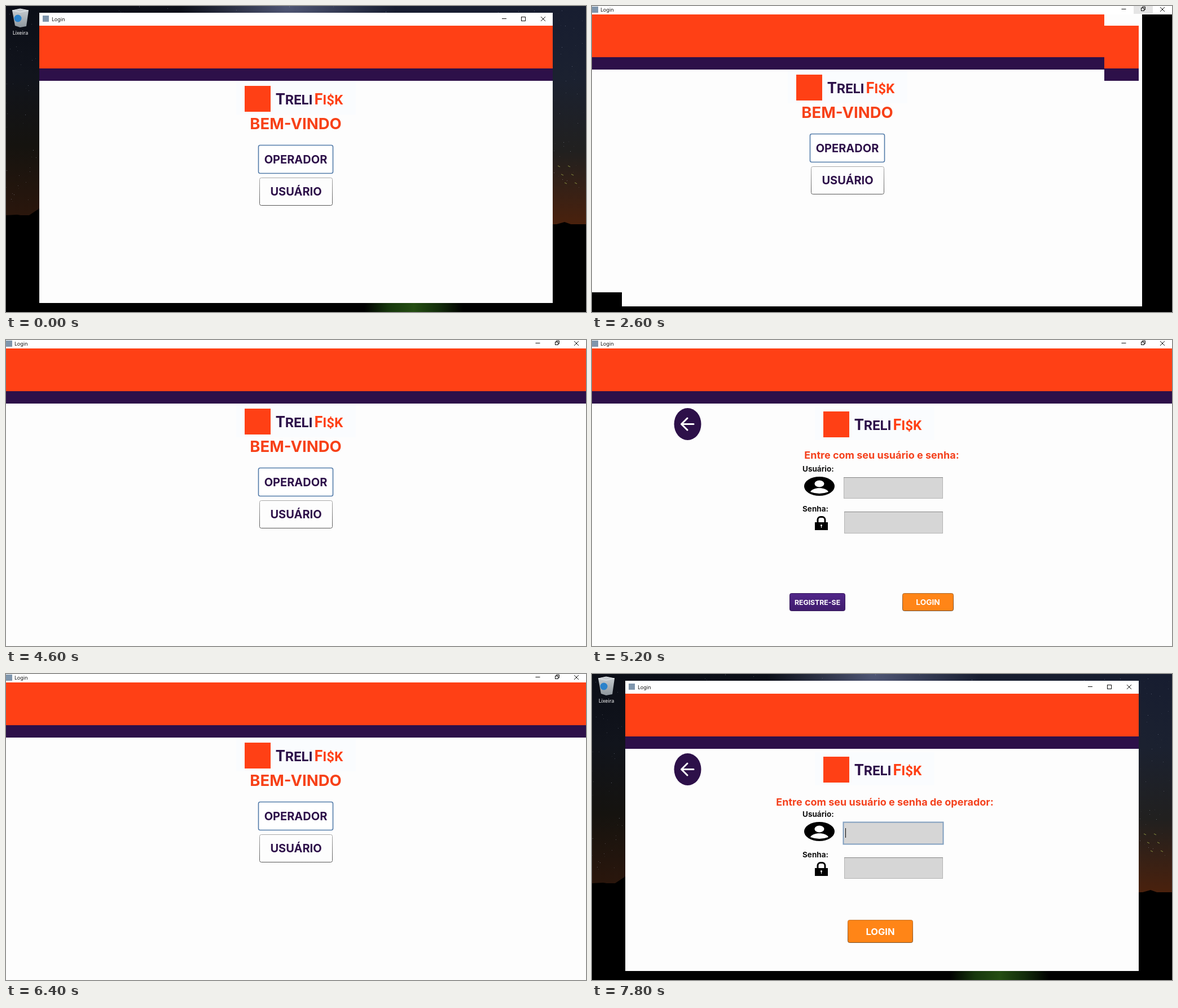
These frames come from a looping animation (1028x544 px, 8 s). An HTML page with a canvas:

```html
<!DOCTYPE html>
<html lang="pt">
<head>
<meta charset="utf-8">
<title>Login</title>
<style>
html, body { margin: 0; width: 100%; height: 100%; overflow: hidden; background: #000; }
canvas { display: block; }
</style>
</head>
<body>
<canvas id="stage" width="1028" height="544"></canvas>
<script>
const c = document.getElementById('stage').getContext('2d');
const ORANGE = '#ff4015', PURPLE = '#2d1049', PAGE = '#fdfdfd', INK = '#111';
const LOOP = 8000;

// start time, page, window mode, hovered window button
const steps = [
  [0, 'welcome', 'window', ''],
  [2400, 'welcome', 'window', 'size'],
  [2600, 'welcome', 'growing', 'size'],
  [2800, 'welcome', 'full', 'size'],
  [3400, 'welcome', 'full', ''],
  [3600, 'operator', 'full', ''],
  [4600, 'welcome', 'full', ''],
  [5000, 'user', 'full', ''],
  [5800, 'welcome', 'full', ''],
  [6000, 'blank', 'full', ''],
  [6200, 'welcome', 'full', ''],
  [7000, 'welcome', 'window', 'both'],
  [7200, 'welcome', 'window', ''],
  [7600, 'operator', 'window', '']
];

function rect(x, y, w, h, fill) {
  c.fillStyle = fill;
  c.fillRect(x, y, w, h);
}

function ellipse(x, y, rx, ry, fill) {
  c.fillStyle = fill;
  c.beginPath();
  c.ellipse(x, y, rx, ry, 0, 0, 7);
  c.fill();
}

function line(color, width, ...points) {
  c.strokeStyle = color;
  c.lineWidth = width;
  c.beginPath();
  points.forEach(([x, y]) => c.lineTo(x, y));
  c.stroke();
}

function text(str, x, y, size, fill, align = 'left', font = '700', family = 'Inter') {
  c.font = `${font} ${size}px "${family}", sans-serif`;
  c.textAlign = align;
  c.fillStyle = fill;
  c.fillText(str, x, y);
  return c.measureText(str).width;
}

function gradient(y0, y1, ...colors) {
  const g = c.createLinearGradient(0, y0, 0, y1);
  colors.forEach((color, i) => g.addColorStop(i / (colors.length - 1), color));
  return g;
}

function button(label, x, y, w, h, size, fill, ink, border, width = 1) {
  c.beginPath();
  c.roundRect(x + .5, y + .5, w - 1, h - 1, 3);
  c.fillStyle = fill;
  c.fill();
  c.strokeStyle = border;
  c.lineWidth = width;
  c.stroke();
  text(label, x + w / 2, y + h / 2 + size * .37, size, ink, 'center');
}

function desktop() {
  rect(0, 0, 1028, 544, '#000');
  rect(0, 0, 514, 372, gradient(0, 372, '#0b0e17', '#11141c', '#15130f', '#2a160c'));
  rect(514, 0, 514, 388, gradient(0, 388, '#171d30', '#1b2130', '#21201f', '#4a210d'));
  const haze = c.createRadialGradient(500, 0, 5, 500, 0, 190);
  haze.addColorStop(0, '#4d5472');
  haze.addColorStop(1, '#4d547200');
  rect(300, 0, 400, 12, haze);
  let seed = 7;
  const rand = () => (seed = seed * 16807 % 2147483647) / 2147483647;
  for (let i = 0; i < 650; i++)
    rect(rand() * 1028 | 0, rand() * 350 | 0, 1, 1, `rgba(190,200,220,${rand() * .45})`);
  for (let i = 0; i < 6; i++)
    line('#8c9440', 1, [978 + i * 6, 284 + i * 15 % 45], [982 + i * 6, 286 + i * 15 % 45]);
  c.fillStyle = '#000';
  c.beginPath();
  [[0, 372], [20, 371], [38, 374], [59, 360], [59, 544], [969, 544], [969, 390], [990, 384],
    [1004, 389], [1028, 390], [1028, 544], [0, 544]].forEach(([x, y]) => c.lineTo(x, y));
  c.fill();
  const grass = c.createLinearGradient(635, 0, 810, 0);
  ['#000', '#17370d', '#244d12', '#132d0b', '#000'].forEach((g, i) => grass.addColorStop(i / 4, g));
  rect(635, 528, 175, 16, grass);

  // recycle bin
  c.fillStyle = gradient(5, 38, '#c9ced2', '#8f979d');
  c.beginPath();
  [[11, 8], [25, 5], [40, 8], [36, 36], [25, 38], [16, 35]].forEach(([x, y]) => c.lineTo(x, y));
  c.fill();
  line('#e8ecee', 1, [11, 8], [25, 11], [40, 8], [25, 5], [11, 8]);
  ellipse(21, 22, 6.5, 6.5, '#2a82cb');
  text('Lixeira', 25.5, 51, 9, '#fff', 'center', '400', 'Noto Sans');
}

function titleBar(full, hover) {
  const top = full ? 0 : 12, left = full ? 0 : 59, h = full ? 15 : 23;
  const right = full ? 1028 : 969, mid = full ? 6 : 23;
  const [min, size, close] = full ? [942.5, 977, 1011] : [883, 917, 952];
  rect(left, top, right - left, h, '#fff');
  if (hover) rect(size - 17, top, 34, full ? 14 : h, '#e5e5e5');
  if (hover === 'both') rect(close - 17, top, 34, h, '#f5c3c9');
  rect(full ? 0 : 65, full ? 1 : 17, 11, 11, '#7f96ad');
  text('Login', full ? 15 : 81, full ? 10 : 27, 9, '#111', 'left', '400', 'Noto Sans');
  line(INK, 1, [min - 4, mid - .5], [min + 4, mid - .5]);
  c.strokeStyle = INK;
  if (full) {
    c.strokeRect(size - 3.5, mid - 2.5, 5, 5);
    line(INK, 1, [size - 1.5, mid - 2.5], [size - 1.5, mid - 4.5], [size + 3.5, mid - 4.5],
      [size + 3.5, mid + .5], [size + 1.5, mid + .5]);
  } else c.strokeRect(size - 3.5, mid - 3.5, 7, 7);
  line(INK, 1, [close - 4, mid - 4], [close + 4, mid + 4]);
  line(INK, 1, [close + 4, mid - 4], [close - 4, mid + 4]);
}

function header(x, y, w) {
  rect(x, y, w, 76, ORANGE);
  rect(x, y + 76, w, 22, PURPLE);
}

function logo(x, y) {
  rect(x - 15, y - 7, 212, 59, '#fafcfe');
  rect(x, y + 1, 46, 46, ORANGE);
  let pen = x + 55;
  const parts = [['T', 27, PURPLE], ['RELI', 24, PURPLE], ['F', 27, ORANGE], ['I$K', 24, ORANGE]];
  parts.forEach(([str, size, fill], i) => {
    if (i === 2) pen += 3;
    pen += text(str, pen, y + 34, size, fill, 'left', '700', 'Roboto');
  });
}

function field(x, y, w, h, focus) {
  rect(x, y, w, h, '#d6d6d6');
  c.lineWidth = focus ? 2 : 1;
  c.strokeStyle = focus ? '#819fc0' : '#b4b4b4';
  c.strokeRect(x + .5, y + .5, w - 1, h - 1);
  if (focus) rect(x + 4, y + 11, 1, 17, '#000');
  else line('#858585', 1, [x, y + .5], [x + w, y + .5]);
}

function person(x, y) {
  ellipse(x, y, 27, 17, '#000');
  ellipse(x, y - 4.5, 8.5, 6, '#fff');
  c.beginPath();
  c.moveTo(x - 16, y + 10);
  c.bezierCurveTo(x - 12, y + 1, x + 12, y + 1, x + 16, y + 10);
  c.quadraticCurveTo(x, y + 16, x - 16, y + 10);
  c.fill();
}

function lock(x, y) {
  rect(x, y + 11, 23, 14, '#000');
  c.strokeStyle = '#000';
  c.lineWidth = 3;
  c.beginPath();
  c.roundRect(x + 5, y + 1.5, 13, 16, 5);
  c.stroke();
  rect(x, y + 11, 23, 14, '#000');
  ellipse(x + 11.5, y + 16.5, 1.5, 1.5, '#fff');
  rect(x + 11, y + 17, 1, 4, '#fff');
}

function welcome() {
  logo(423, 121);
  text('BEM-VINDO', 513.5, 199, 27.5, '#f74118', 'center');
  button('OPERADOR', 447, 227, 133, 51, 20, '#fff', PURPLE, '#527ba9', 1.6);
  button('USUÁRIO', 449, 285, 130, 50, 20, PAGE, PURPLE, gradient(285, 335, '#aaa', '#555'));
}

function form(operator) {
  const up = operator ? 0 : 1;
  ellipse(169.5, 149.5, 24, 28.5, PURPLE);
  c.lineCap = c.lineJoin = 'round';
  line('#fff', 3, [180, 149.5], [159, 149.5]);
  line('#fff', 3, [169, 139], [158.5, 149.5], [169, 160]);
  c.lineCap = 'butt';
  c.lineJoin = 'miter';
  logo(410, 126);
  text(operator ? 'Entre com seu usuário e senha de operador:' : 'Entre com seu usuário e senha:',
    operator ? 519 : 513.5, operator ? 214 : 210.5, 18, '#f4411d', 'center');
  text('Usuário:', 373, 234, 13.5, INK);
  person(403, 260);
  field(operator ? 445 : 446, operator ? 243 : 244, operator ? 178 : 176, operator ? 40 : 38, operator);
  text('Senha:', 373, 306 - up, 13.5, INK);
  lock(395, 314 - up);
  field(447, 306 - up, 175, 38 + up, false);
}

function formButtons(operator) {
  const border = gradient(437, 482, '#c9752a', '#6b4a2a');
  if (operator) {
    button('LOGIN', 453, 437, 116, 41, 16.5, '#ff8517', '#fff', border);
  } else {
    button('REGISTRE-SE', 350, 450, 99, 32, 12.3, gradient(450, 482, '#52278a', '#3f1c6c'), '#fff', '#35175a');
    button('LOGIN', 550, 450, 91, 32, 13.7, '#ff8517', '#fff', border);
  }
}

function scene(page, mode, hover) {
  const full = mode !== 'window', growing = mode === 'growing';
  if (full) rect(0, 0, 1028, 544, PAGE);
  else {
    desktop();
    rect(59, 12, 910, 516, PAGE);
  }
  if (growing) {
    rect(975, 15, 53, 529, '#000');
    rect(0, 534, 1028, 10, '#000');
    rect(0, 509, 53, 35, '#000');
    header(908, 35, 61);
  }
  titleBar(full, hover);
  if (page === 'blank') return;
  if (full) header(0, 15, growing ? 908 : 1028);
  else header(59, 35, 910);

  c.save();
  c.translate(growing ? -61 : 0, full ? 0 : 20);
  if (page === 'welcome') welcome();
  else form(page === 'operator');
  c.restore();
  if (page !== 'welcome') formButtons(page === 'operator');
}

function frame() {
  const t = performance.now() % LOOP;
  const [, page, mode, hover] = steps.findLast(step => step[0] <= t);
  scene(page, mode, hover);
  requestAnimationFrame(frame);
}
frame();
</script>
</body>
</html>
```
